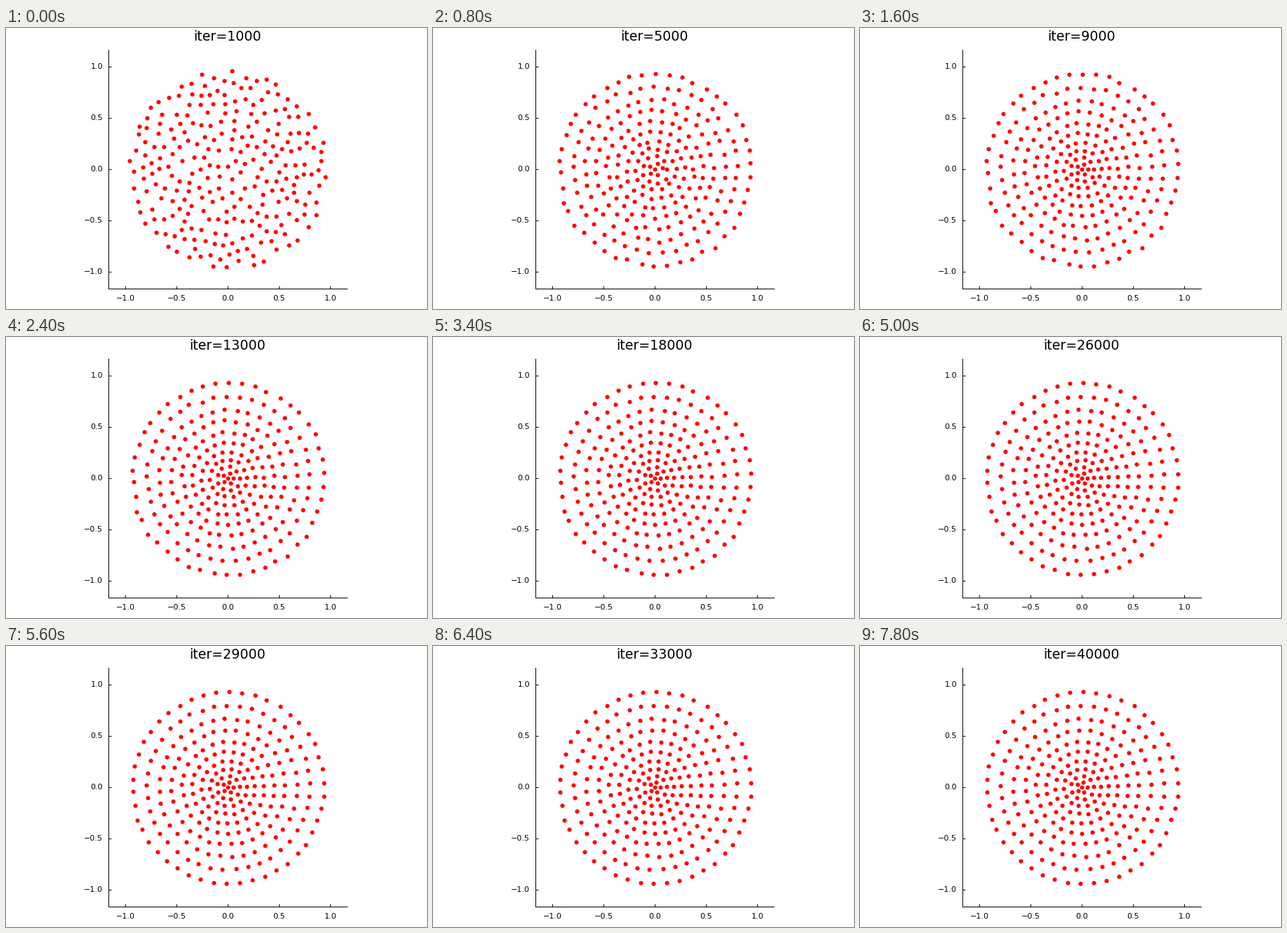
Animation of 600 by 400 pixels, one loop 8 s. Source, as a matplotlib script:

```python
import numpy as np
import matplotlib.pyplot as plt
from matplotlib.animation import FuncAnimation

FRAMES = 40
LIM = 170 / 146
RINGS = 10
PHASE = np.radians(3)


def polar(radius, theta):
    return np.column_stack([radius * np.cos(theta), radius * np.sin(theta)])


def layout():
    """Settled rings, dense in the middle, and an even spread of the same dots."""
    counts = [round(4.55 * k) for k in range(1, RINGS + 1)]
    total = 1 + sum(counts)
    home, start, placed = [np.zeros((1, 2))], [np.zeros((1, 2))], 1
    for k, count in enumerate(counts, 1):
        theta = PHASE + 2 * np.pi * np.arange(count) / count
        home.append(polar(0.0465 * k + 0.0047 * k * k, theta))
        start.append(polar(0.98 * np.sqrt((placed + count / 2) / total), theta))
        placed += count
    return np.vstack(home), np.vstack(start)


def push_apart(pts, gap, rounds):
    for _ in range(rounds):
        diff = pts[:, None] - pts
        dist = np.hypot(diff[..., 0], diff[..., 1]) + np.eye(len(pts))
        push = (gap - dist).clip(0) / dist
        pts = pts + 0.3 * (push[..., None] * diff).sum(axis=1)
    return pts


rng = np.random.default_rng(12)
home, start = layout()
start = push_apart(start + rng.normal(0, 0.035, start.shape), 0.1, 4)
size = np.hypot(*start.T)[:, None]
start *= np.minimum(1, 0.965 / size)

# outer dots roam more than the tightly packed inner ones
room = np.hypot(*home.T)[:, None] ** 0.5
wander = rng.normal(0, 0.017, home.shape) * room
home += rng.normal(0, 0.005, home.shape) * room


def dots(step):
    fast = np.exp(-step / 2.3)
    slow = np.exp(-step / 14) - fast
    return home + (start - home) * fast + wander * slow


plt.rcParams["font.family"] = "DejaVu Sans"
fig = plt.figure(figsize=(6, 4), dpi=100, facecolor="white")
ax = fig.add_axes([146.4 / 600, 28.6 / 400, 340 / 600, 340 / 400])
ticks = np.linspace(-1, 1, 5)
ax.set(xlim=(-LIM, LIM), ylim=(-LIM, LIM), xticks=ticks, yticks=ticks)
ax.tick_params(direction="in", length=2.9, width=0.72, labelsize=8)
ax.tick_params(axis="x", pad=6)
ax.tick_params(axis="y", pad=6)
plt.setp(ax.get_yticklabels(), va="center")
for side, spine in ax.spines.items():
    spine.set_linewidth(0.72)
    spine.set_visible(side in ("left", "bottom"))

title = fig.text(316 / 600, 1 - 18 / 400, "", fontsize=13.7,
                 ha="center", va="baseline")
points, = ax.plot([], [], "o", color="#ff0000", ms=4.4, mew=0, clip_on=False)


def draw(step):
    points.set_data(*dots(step).T)
    title.set_text(f"iter={(step + 1) * 1000}")
    return points, title


anim = FuncAnimation(fig, draw, frames=FRAMES, interval=200,
                     repeat=True, repeat_delay=0)
plt.show()
```
